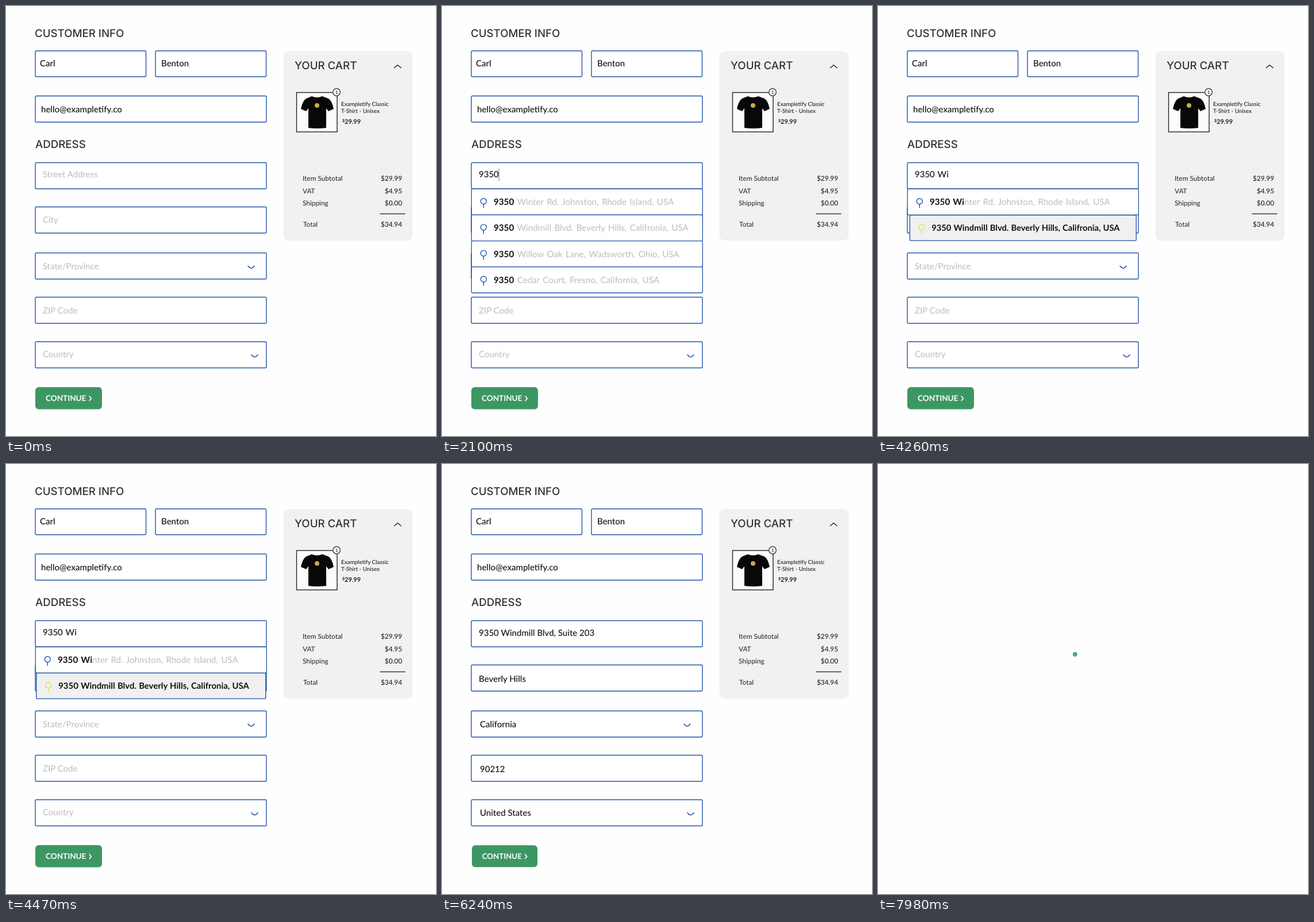
An HTML page that plays this animation: 748x748 px, repeating every 8 s.

```html
<!DOCTYPE html>
<html lang="en">
<head>
<meta charset="utf-8">
<title>Checkout form</title>
<style>
  html, body { margin: 0; height: 100%; overflow: hidden; background: #fefefe; }
  svg { display: block; width: 100vw; height: 100vh; }
  text { font: 500 15px Lato, sans-serif; fill: #111; white-space: pre; text-rendering: geometricPrecision; }
  .head { font: 500 18.7px Inter, sans-serif; fill: #333; }
  .hint { font-weight: 400; fill: #bdbdbd; }
  .item { font-size: 15.2px; word-spacing: 1.5px; font-weight: 400; fill: #bdbdbd; }
  .item tspan, .chosen { font-weight: 700; fill: #111; }
  .chosen { font-size: 15px; word-spacing: .6px; }
  .typed { word-spacing: 1.2px; }
  .name { font-size: 9.8px; fill: #222; }
  .row { font-size: 11.8px; fill: #333; }
  .sum { font-size: 11.8px; fill: #222; text-anchor: end; }
  .price { font-size: 11px; font-weight: 700; fill: #222; }
  .go { font-size: 13.5px; font-weight: 700; fill: #fff; }
</style>
</head>
<body>
<svg id="stage" viewBox="0 0 748 748"></svg>
<script>
const LOOP = 8000, STEP = 30;
const BLUE = '#2455a8', PALE = '#5583c6', GREEN = '#3d9763';
const stage = document.getElementById('stage');

const text = (x, y, s, cls = '') => `<text x="${x}" y="${y}" class="${cls}">${s}</text>`;
const rect = (x, y, w, h, attrs) => `<rect x="${x}" y="${y}" width="${w}" height="${h}" ${attrs}/>`;
const path = (d, color, width = 1.4) =>
  `<path d="${d}" fill="none" stroke="${color}" stroke-width="${width}" stroke-linecap="round"/>`;
const box = (x, y, w, h) => rect(x, y, w, h, `rx="2" fill="#fff" stroke="${BLUE}" stroke-width="1.4"`);
const chevron = (x, y) => path(`M${x - 5.5} ${y - 2}q5.5 8 11 0`, BLUE);
const pin = (x, y, color) =>
  `<circle cx="${x}" cy="${y}" r="5" fill="none" stroke="${color}" stroke-width="1.4"/>` +
  path(`M${x} ${y + 5}v6`, color);
const scaled = (k, x, y, inner) =>
  `<g transform="translate(${x} ${y}) scale(${k}) translate(${-x} ${-y})">${inner}</g>`;
const pulse = (t, start, length, depth) =>
  t > start && t < start + length ? 1 - depth * Math.sin(Math.PI * (t - start) / length) : 1;

// [bold part, rest]
const byNumber = [
  ['935', ' Maple Hollow St. Pittsburg, California, USA'],
  ['9352', ' W. Marlowe Dr. Carmichael, California, USA'],
  ['9359', ' East Pinewood Street, Hanford, California, USA']
];
const byStreet = [
  ['9350 Wi', 'nter Rd. Johnston, Rhode Island, USA'],
  ['9350 Wi', 'ndmill Blvd. Beverly Hills, Califronia, USA'],
  ['9350 Wi', 'llow Oak Lane, Wadsworth, Ohio, USA']
];
const wide = [...byStreet.map(([a, b]) => ['9350', ' Wi' + b]),
  ['9350', ' Cedar Court, Fresno, California, USA']];

// [time, typed text, cursor x, suggestions]
const typing = [
  [300, '9', 73, byNumber],
  [900, '93', 82, byNumber],
  [1500, '935', 91, byNumber],
  [2100, '9350', 99, wide],
  [2700, '9350 ', 103, wide],
  [3000, '9350 W', 118, byStreet],
  [3600, '9350 Wi', 122, byStreet]
];

const fields = [
  // y, hint, hint baseline, value, value x, value baseline
  [272.5, 'Street Address', 298, '9350 Windmill Blvd, Suite 203', 64, 299],
  [349.5, 'City', 377, 'Beverly Hills', 64, 378.5],
  [429.5, 'State/Province', 457.5, 'California', 66, 457.5],
  [506.5, 'ZIP Code', 535, '90212', 66, 535.5],
  [584, 'Country', 610.5, 'United States', 66, 612]
];

const header =
  text(50, 53.5, 'CUSTOMER INFO', 'head') + text(51, 247, 'ADDRESS', 'head') +
  box(51, 78, 192.5, 45) + text(59, 105, 'Carl') +
  box(260, 78, 192.5, 45) + text(270, 105, 'Benton') +
  box(51, 156.5, 402, 45.5) + text(61, 184.5, 'hello@exampletify.co');

const cart =
  rect(482.5, 78.5, 225, 329.5, 'rx="9" fill="#f1f1f1"') +
  text(502, 110, 'YOUR CART', 'head') +
  path('M675.5 107.5l5.8-4.8 5.8 4.8', '#222') +
  rect(505.5, 150.5, 70.5, 68.5, 'fill="#fcfcfc" stroke="#222" stroke-width="1.4"') +
  `<path d="M532 157q9 4 18 0l11 4q6 4 9 18l-9 4-4-5v34q-16 2-31 0v-34l-4 5-9-4q3-14 9-18z" fill="#080808"/>
   <circle cx="541" cy="173" r="4" fill="#c9a94e"/>
   <circle cx="575" cy="150" r="6.3" fill="#fff" stroke="#222" stroke-width="1.2"/>
   <text x="575" y="153" style="font-size:8px;text-anchor:middle">1</text>` +
  text(583, 173.5, 'Exampletify Classic', 'name') + text(583, 185.5, 'T-Shirt - Unisex', 'name') +
  `<text x="585" y="201.5" class="price" style="font-size:7px">$</text>` + text(589, 205, '29.99', 'price') +
  [['Item Subtotal', '$29.99', 304], ['VAT', '$4.95', 325.5], ['Shipping', '$0.00', 347], ['Total', '$34.94', 384]]
    .map(([label, sum, y]) => text(y > 380 ? 517 : 516, y, label, 'row') + text(689, y, sum, 'sum')).join('') +
  path('M651 361.5h43', '#333');

const button =
  rect(51, 663, 116, 38.5, `rx="6" fill="${GREEN}"`) + text(69, 687, 'CONTINUE', 'go') +
  path('M145.2 679l3 3.7-3 3.7', '#fff', 1.7);

function form(t) {
  const filled = t >= 4500;
  const hints = fields.map(([y, hint, base, value, x, valueBase], i) =>
    box(51, y, 402, 45.5) +
    (filled ? text(x, valueBase, value) : i || t < 300 ? text(64, base, hint, 'hint') : '')).join('');
  return hints + chevron(426.5, 454) + chevron(432.5, 608.5);
}

function suggestion([bold, rest], i, color) {
  const h = color === BLUE ? 45.2 : 45.7, y = 318.2 + i * h;
  return rect(51.3, y, 402, h, `rx="2" fill="#fff" stroke="${color}" stroke-width="1.3"`) +
    pin(72.3, y + 21.5, BLUE) +
    text(90, y + 28, `<tspan>${bold}</tspan>${rest}`, 'item');
}

function dropdown(t) {
  const now = typing.filter(s => s[0] <= t).pop();
  if (!now || t >= 4500) return '';
  const [, typed, cursor, list] = now;
  const entry = text(64, 298, typed, 'typed');
  const color = list === byNumber ? PALE : BLUE;
  if (t < 4200) {
    return entry + path(`M${cursor} 283v21`, '#888', 1.2) +
      list.map((item, i) => suggestion(item, i, color)).join('');
  }
  const chosen =
    rect(51.3, 363.4, 402, 45.2, `rx="2" fill="#f0f0f0" stroke="${BLUE}" stroke-width="1.4"`) +
    pin(72.3, 385, '#e9dc4c') + text(90, 391.3, list[1].join(''), 'chosen');
  return entry + suggestion(list[0], 0, BLUE) + scaled(pulse(t, 4170, 330, .027), 252, 386, chosen);
}

function draw(t) {
  const fade = Math.max(0, Math.min(1, (6420 - t) / 180));
  let out = '';
  if (fade) {
    out = `<g opacity="${fade}">` + header + form(t) + dropdown(t) + cart +
      scaled(pulse(t, 5580, 690, .12), 109, 682, button) + '</g>';
  }
  if (t >= 6420) {
    const y = 388 - 57 * Math.cos(2 * Math.PI * (t - 7980) / 1500);
    out += `<circle cx="342.7" cy="${y}" r="4" fill="#45b27b" opacity="${Math.min(1, (t - 6390) / 120)}"/>`;
  }
  stage.innerHTML = out;
}

let last = -1;
const start = performance.now();
function tick() {
  const t = Math.floor((performance.now() - start) % LOOP / STEP) * STEP;
  if (t !== last) draw(last = t);
  requestAnimationFrame(tick);
}
tick();
</script>
</body>
</html>
```
